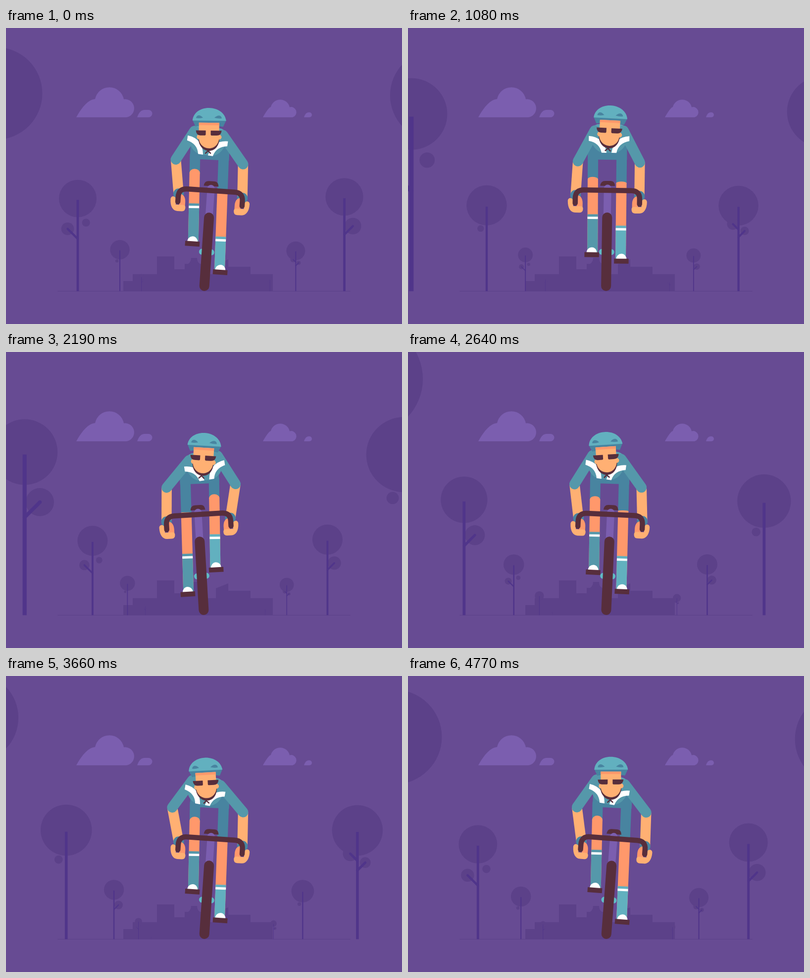
Animation, 800 px wide and 600 px high, one loop 4800 ms. Source, as an HTML page with a canvas:

```html
<!DOCTYPE html>
<html lang="en">
<head>
<meta charset="utf-8">
<title>Cyclist</title>
<style>
html, body { margin: 0; height: 100%; overflow: hidden; background: #674b93; }
canvas { display: block; }
</style>
</head>
<body>
<canvas id="stage" width="800" height="600"></canvas>
<script>
const ctx = document.getElementById('stage').getContext('2d');
const LOOP = 4800, CYCLE = 960, GROUND = 533.5, RAD = Math.PI / 180;
const C = {
  sky: '#674b93', shade: '#5c4189', trunk: '#50358a', cloud: '#7b5eaf',
  light: '#62b0bf', back: '#5ca5b5', mid: '#5598aa', dark: '#4884a0',
  skin: '#ffb073', tan: '#ff986b', brown: '#572e3c', white: '#fff', crank: '#60bcc6'
};

function at(x, y, degrees, draw) {
  ctx.save();
  ctx.translate(x, y);
  ctx.rotate(degrees * RAD);
  draw();
  ctx.restore();
}
function fill(color, path) {
  ctx.fillStyle = color;
  ctx.fill(new Path2D(path));
}
function stroke(color, width, path, cap = 'round') {
  ctx.strokeStyle = color;
  ctx.lineWidth = width;
  ctx.lineCap = cap;
  ctx.lineJoin = 'round';
  ctx.stroke(new Path2D(path));
}
function rect(color, x, y, w, h) {
  ctx.fillStyle = color;
  ctx.fillRect(x, y, w, h);
}
function disc(color, x, y, rx, ry = rx) {
  ctx.fillStyle = color;
  ctx.beginPath();
  ctx.ellipse(x, y, rx, ry, 0, 0, 7);
  ctx.fill();
}
function rotated(cx, cy, degrees, x, y) {
  const c = Math.cos(degrees * RAD), s = Math.sin(degrees * RAD);
  return [cx + x * c - y * s, cy + x * s + y * c];
}
function mirrored(draw) {
  for (const side of [-1, 1]) {
    ctx.save();
    ctx.scale(-side, 1);
    draw();
    ctx.restore();
  }
}

// Trees in units of their height: crown height, crown radius, bulbs [x, y, radius, has branch]
const plain = { top: 1, r: .234, bulbs: [[-.07, .73, .038]] };
const leftArm = { top: .98, r: .198, bulbs: [[-.107, .66, .067, 1], [.087, .725, .042]] };
const rightArm = { top: 1.01, r: .203, bulbs: [[.094, .7, .087, 1]] };
const twoArms = { top: 1, r: .232, bulbs: [[-.065, .785, .068, 1], [.072, .704, .049, 1]] };
const lowArm = { top: 1, r: .199, bulbs: [[.09, .69, .088, 1]] };
const leftRow = [plain, leftArm, rightArm, plain, leftArm];
const rightRow = [twoArms, lowArm, plain, twoArms, lowArm];

function tree(x, h, { top, r, bulbs }) {
  if (h <= 0) return;
  const w = h * .025;
  disc(C.shade, x, GROUND - h * top, h * r);
  for (const [bx, by, br] of bulbs) disc(C.shade, x + bx * h, GROUND - by * h, br * h);
  rect(C.trunk, x - w / 2, GROUND - h * top * .985, w, h * top * .985);
  for (const [bx, by, , branch] of bulbs) {
    if (branch) stroke(C.trunk, w * .9,
      `M${x},${GROUND - (by - Math.abs(bx)) * h}L${x + bx * h},${GROUND - by * h}`);
  }
}

// The rows recede towards the skyline by one place per cycle
function trees(t) {
  const turn = t / CYCLE;
  for (let k = Math.floor(turn) + 1; k < turn + 6.5; k++) {
    const depth = k - 2 - turn;
    const left = 320 - 46.3 * 1.945 ** depth;
    const right = 473.5 + 59.6 * 1.878 ** depth;
    tree(left, 1.265 * (296.5 - left), leftRow[k % 5]);
    tree(right, 1.115 * (right - 512), rightRow[k % 5]);
  }
}

function scenery() {
  rect(C.sky, 0, 0, 800, 600);
  fill(C.cloud, 'M142,181C152,163 165,145 180,144A29.5,29.5 0 0 1 238,144.5A18.3,18.3 0 0 1 243,181Z');
  fill(C.cloud, 'M265,181Q270,166 280,166H288A7.5,7.5 0 0 1 288,181Z');
  fill(C.cloud, 'M519,181C524,172 530,162 535,160A19.5,19.5 0 0 1 573,160.500A10.200,10.200 0 0 1 579,181Z');
  fill(C.cloud, 'M602,181Q605,171 611,171H613A5,5 0 0 1 613,181Z');
  fill(C.shade, 'M237,534V513H256V499H305V463H340V489H361V478H368Q374,474 374,466H386Q386,475 392,478H400V499H424V479L449,469V484H494V499H539V534Z');
  rect(C.shade, 104, 533, 592, 1);
}

function leg(side, hipX, pedal, lean) {
  const [x, y] = rotated(400, 533, lean, side * 28.5, pedal - 5);
  const dx = hipX + side * 29 - x, dy = 255 - y;
  const lift = (-67 - pedal) / 32.5;
  const sock = side < 0 ? 77 : 67;
  const knee = 154.5 - 9.1 * lift;
  const bend = Math.max(0, 4 + 5 * lift);
  at(x, y, Math.atan2(dx, -dy) / RAD, () => {
    rect(C.dark, -10.5, -Math.hypot(dx, dy), 21, Math.hypot(dx, dy) - knee + bend + 1);
    rect(C.tan, -10.5, -knee + bend, 21, knee - bend);
    disc(C.tan, 0, -knee + bend, 10.5, bend);
    rect(side < 0 ? C.mid : C.light, -10.5, -sock, 21, sock);
    rect(C.white, -10.5, -sock + 5, 21, 4.7);
  });
}

function pedal(side, y) {
  const x = side * 30;
  fill(C.white, `M${x - 10.5},${y - 4}a10.5,11 0 0 1 21,0z`);
  rect(C.brown, x - 14.7, y - 5, 29.4, 10);
}

function frameAndWheel(left, right) {
  fill(C.brown, 'M-15,-213Q-14,-223 -5,-223H6Q14,-223 15,-213Z');
  stroke(C.cloud, 15, 'M0,-208V-140');
  pedal(-1, left);
  pedal(1, right);
  stroke(C.crank, 12, 'M-9.500,-79H9.500');
  stroke(C.brown, 20, 'M0,-149V-10');
}

function handsAndBar() {
  mirrored(() => at(-65, -177, 0, () => {
    fill(C.tan, 'M3,-16C11,-16 15,-9 15,0V8H3Z');
    fill(C.skin, 'M-15,-4C-15,-12 -5,-12 -4,-4V6H11Q16,6 16,11Q16,19 9,19H0C-9,19 -15,10 -15,-4Z');
  }));
  stroke(C.brown, 10.5, 'M-65,-177V-187Q-65,-204 -48,-204H48Q65,-204 65,-187V-177');
}

function arm(shoulder, elbow, wrist) {
  stroke(C.skin, 20.5, `M${elbow}L${wrist}`, 'butt');
  disc(C.dark, wrist[0], wrist[1], 10.8);
  stroke(C.mid, 21, `M${shoulder}L${elbow}`);
}

function chest() {
  fill(C.mid, 'M-38,10C-36,32 -24,45 -8,45H8C24,45 36,32 38,10Q0,-22 -38,10Z');
  mirrored(() => fill(C.white, 'M-41,11Q-10,13 -5,45H-15Q-19,25 -41,21Z'));
}

function head() {
  fill(C.dark, 'M-34,0H34L28,13Q0,8 -28,13Z');
  fill(C.brown, 'M-22,34C-22,53 -11,62 0,62S21,53 21,34Z');
  stroke(C.brown, 2.5, 'M-7,67L-2,62L3,67');
  disc(C.skin, -20, 34, 5);
  disc(C.skin, 20, 34, 5);
  fill(C.skin, 'M-21,5H20V35C20,48 11,57 0,57S-21,48 -21,35Z');
  rect(C.tan, -21, 5, 41, 5);
  fill(C.brown, 'M-27,21H-7V29Q-7,31 -9,31H-18Q-26,31 -27,21Z');
  fill(C.brown, 'M25,21H3V29Q3,31 5,31H15Q24,31 25,21Z');
  fill(C.light, 'M-34,1C-33,-15 -18,-25 -1,-25C17,-25 32,-15 34,1Z');
  fill(C.dark, 'M-27,-4C-26,-11 -19,-12 -13,-5Q-20,-3 -27,-4Z');
  fill(C.dark, 'M25,-4C24,-11 17,-12 10,-5Q18,-3 25,-4Z');
}

function rider(t) {
  const angle = t / CYCLE * 360;
  const cos = shift => Math.cos((angle + shift) * RAD);
  const sin = shift => Math.sin((angle + shift) * RAD);
  const bounce = Math.sin(2 * angle * RAD);
  const sway = cos(33.75), lean = 4.7 * sway;
  const left = -67 - 32.5 * sway, right = -67 + 32.5 * sway;
  const hipX = 400.3 + 12.9 * sway;
  const torso = [401 + 8.5 * cos(5), 213 - 5 * bounce, 11.3 * cos(42)];
  const wrist = side => rotated(400, 533, lean, side * 64.5, -193);
  const elbows = [
    [332.7 + 10.3 * cos(0) - 3.7 * sin(0) + 6 * bounce, 271 - 5.5 * sway],
    [467.8 + 11.2 * cos(0) - 3.8 * sin(0) - 4.6 * bounce, 271.5 + 5.5 * sway]
  ];

  leg(-1, hipX, left, lean);
  leg(1, hipX, right, lean);
  at(hipX, 267, lean * .7, () => rect(C.dark, -39.5, -34, 79, 34));
  at(400, 533, lean, () => frameAndWheel(left, right));
  at(...torso, () => stroke(C.back, 36, 'M-20,5H20'));
  arm(rotated(...torso, -29, 0), elbows[0], wrist(-1));
  arm(rotated(...torso, 29, 0), elbows[1], wrist(1));
  at(...torso, chest);
  at(401 + 10 * cos(-10), 187 - 5 * bounce, 3.7 * sin(10), head);
  at(400, 533, lean, handsAndBar);
}

function draw(now) {
  const t = now % LOOP;
  scenery();
  trees(t);
  rider(t);
  requestAnimationFrame(draw);
}
requestAnimationFrame(draw);
</script>
</body>
</html>
```
